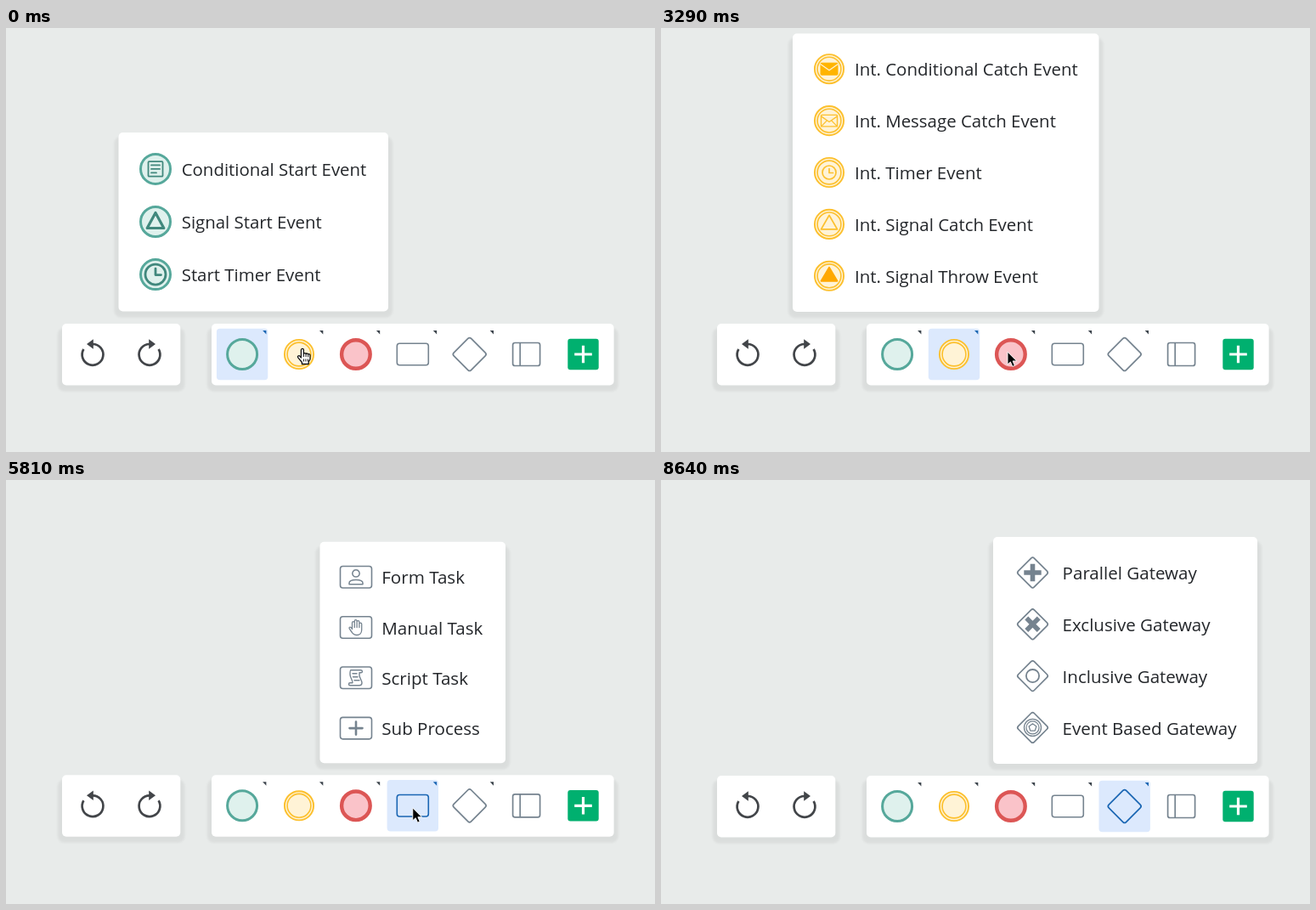
These frames come from a looping animation (764x499 px, 8.94 s). An HTML page:

```html
<!DOCTYPE html>
<html lang="en">
<head>
<meta charset="utf-8">
<title>Process editor palette</title>
<style>
  html, body { margin: 0; width: 100%; height: 100%; overflow: hidden; background: #e8ebea; }
  svg { display: block; width: 764px; height: 499px; }
  text { font-family: "Open Sans", sans-serif; fill: #24272b; }
</style>
</head>
<body>
<svg id="stage" viewBox="0 0 764 499">
  <defs>
    <filter id="soft" x="-10%" y="-20%" width="120%" height="140%"><feGaussianBlur stdDeviation="1.7"/></filter>
  </defs>
  <rect width="764" height="499" fill="#e8ebea"/>
  <g id="scenes"></g>
  <g id="hand">
    <path d="M-1.6 1.5V-7.6a1.5 1.5 0 0 1 3 0V-3a1.4 1.4 0 0 1 2.7 .2a1.4 1.4 0 0 1 2.6 .5a1.3 1.3 0 0 1 2.3 .9V3.2L7.2 6.4V9H-.6V7L-5.4 1.2a1.4 1.4 0 0 1 2-1.8Z"
      fill="#fff" stroke="#111" stroke-width="1.3" stroke-linejoin="round"/>
    <path d="M1.4 -3V.6M4.1 -2.6V.6M6.7 -2V.8M1.4 3V6M3.9 3V6M6.3 3V6" stroke="#111" fill="none"/>
  </g>
  <path id="arrow" d="M0 0V14.8L3.4 11.7L5.8 17.2L8.4 16.1L6.1 10.7H10.7Z" fill="#000" stroke="#fff" stroke-width=".9"/>
</svg>
<script>
const TEAL = '#56a89b', DEEP = '#41887d', MINT = '#dff1ed';
const GOLD = '#fcc02e', AMBER = '#ffa800', CREAM = '#fff3d6';
const RED = '#dc5655', BLUSH = '#fdeced', SLATE = '#75838f', BLUE = '#1a66b3';
const $ = id => document.getElementById(id);

// Shape helpers
const line = (d, color, w = 1.6, fill = 'none') =>
  `<path d="${d}" fill="${fill}" stroke="${color}" stroke-width="${w}" stroke-linejoin="round" stroke-linecap="round"/>`;
const bar = (d, color, w) => `<path d="${d}" fill="none" stroke="${color}" stroke-width="${w}"/>`;
const solid = (d, color) => `<path d="${d}" fill="${color}"/>`;
const circle = (r, color, w, fill = 'none') =>
  `<circle r="${r}" fill="${fill}" stroke="${color}" stroke-width="${w}"/>`;
const box = (w, h, r, color, sw = 1.6, fill = 'none') =>
  `<rect x="${-w / 2}" y="${-h / 2}" width="${w}" height="${h}" rx="${r}" fill="${fill}" stroke="${color}" stroke-width="${sw}"/>`;
const at = (x, y, s, more = '') => `<g transform="translate(${x} ${y}) ${more}">${s}</g>`;
const turn = s => `<g transform="rotate(45)">${s}</g>`;
const tri = (w, top, bottom) => `M0 ${top}L${w} ${bottom}H${-w}Z`;

function panel(x, y, x2, y2) {
  const w = x2 - x, h = y2 - y;
  return `<rect x="${x - 5}" y="${y + 5}" width="${w + 10}" height="${h + 2}" rx="8" fill="#000" opacity=".055" filter="url(#soft)"/>
    <rect x="${x}" y="${y}" width="${w}" height="${h}" rx="5" fill="#fff"/>`;
}

function mail(w, h, color, flap) {
  const a = w / 2, b = h / 2;
  const fold = `M${-a} ${1.5 - b}L0 ${b * .22}L${a} ${1.5 - b}`;
  return flap
    ? box(w, h, 1, color, 1, color) + line(fold, flap, 1.3)
    : box(w, h, 1, color, 1.4) + line(fold + `M${-a} ${b}L${-a * .3} 0M${a} ${b}L${a * .3} 0`, color, 1.3);
}

const ring = {
  start: circle(17.5, TEAL, 3, MINT),
  mid: circle(17.1, GOLD, 1.9, CREAM) + circle(13.9, GOLD, 1.6),
  end: circle(17.6, RED, 3, BLUSH)
};
const diamond = (side, color, w) => turn(box(side, side, 2.6, color, w));
const task = box(37, 25.5, 3, SLATE, 1.6);
const gate = diamond(26.5, SLATE, 1.7);
const cross = bar('M-10.2 0H10.2M0 -10.2V10.2', SLATE, 5.6);

function pentagon(r) {
  const pts = [0, 1, 2, 3, 4].map(i => {
    const a = i * Math.PI * .4;
    return (r * Math.sin(a)).toFixed(2) + ' ' + (-r * Math.cos(a)).toFixed(2);
  });
  return 'M' + pts.join('L') + 'Z';
}

const menus = [
  { area: [132.5, 123, 450, 333.5], icon: 176, text: 206.7, top: 166.3, step: 62.1, size: 20.4, rows: [
    ['Conditional Start Event', ring.start + box(17, 17.5, 1, DEEP, 1.8) + line('M-5 -4.5H5M-5 0H5M-5 4.5H1', DEEP, 1.8)],
    ['Signal Start Event', ring.start + line(tri(9.8, -10.5, 7.5), DEEP, 3.2)],
    ['Start Timer Event', ring.start + circle(12, DEEP, 2.8) + line('M0 -7V.5H6.5', DEEP, 2.8)]
  ] },
  { area: [155, 6.5, 515.5, 334], icon: 198, text: 228, top: 48.6, step: 60.9, size: 20.45, rows: [
    ['Int. Conditional Catch Event', ring.mid + mail(20, 14, '#ffb400', CREAM)],
    ['Int. Message Catch Event', ring.mid + mail(19, 13.5, GOLD)],
    ['Int. Timer Event', ring.mid + circle(8, GOLD, 1.7) + line('M0 -4.5V.5H4.5', GOLD, 1.7)],
    ['Int. Signal Catch Event', ring.mid + line(tri(9.5, -10.5, 6), GOLD, 1.8)],
    ['Int. Signal Throw Event', ring.mid + line(tri(9.5, -10, 6), AMBER, 1.8, AMBER)]
  ] },
  { area: [254, 54.7, 553, 332.7], icon: 298, text: 330, top: 98.4, step: 63.5, size: 20.45, rows: [
    ['Error End Event', circle(16.8, RED, 4.3, BLUSH) + solid('M-9 9.5L-4.5 -11L2 -1L8.5 -10L3.8 10.5L-2.5 .5Z', RED)],
    ['Message End Event', circle(17.6, '#f16d77', 4.4, BLUSH) + mail(24, 17.5, RED, BLUSH)],
    ['Signal End Event', ring.end + line(tri(12.2, -13, 8.5), RED, 1.6, RED)],
    ['Terminate End Event', ring.end + `<circle r="12.2" fill="${RED}"/>`]
  ] },
  { area: [369.5, 73.5, 588, 334], icon: 412, text: 442.2, top: 115.3, step: 59.3, size: 20.6, rows: [
    ['Form Task', task + line('M0 -8.5a4.2 4.2 0 1 1 -.01 0ZM-8 8.5V7C-8 2 8 2 8 7V8.5Z', SLATE, 1.5)],
    ['Manual Task', task + line('M-4.5 2V-5.5a1.4 1.4 0 0 1 2.8 0V-7.5a1.4 1.4 0 0 1 2.8 0V-6.5a1.4 1.4 0 0 1 2.8 0V-4a1.4 1.4 0 0 1 2.8 0V3C6.7 7 4 9 1 9C-3 9 -4 7 -8 1C-8 -1 -6 -1 -4.5 2M-1.7 -5V0M1.1 -6V0M3.9 -5V0', SLATE, 1.3)],
    ['Script Task', task + line('M-6 -9H5.5C8 -9 8 -6 6 -6H4V-3C4 0 7 3 7 6C7 9 5 9 4 9H-7C-9 9 -9 6 -7 6H-4C-4 2 -7 0 -7 -4C-7 -7 -7 -9 -6 -9M-4 -5H1M-3.5 -1H2M-2 3H4', SLATE, 1.4)],
    ['Sub Process', task + line('M-7.5 0H7.5M0 -7.5V7.5', SLATE, 2.6)]
  ] },
  { area: [391, 67, 702, 334], icon: 437.5, text: 472.6, top: 109.4, step: 60.8, size: 20.55, rows: [
    ['Parallel Gateway', gate + cross],
    ['Exclusive Gateway', gate + turn(cross)],
    ['Inclusive Gateway', gate + circle(7.6, SLATE, 1.8)],
    ['Event Based Gateway', gate + circle(10, SLATE, 1.3) + circle(7.5, SLATE, 1.2) + line(pentagon(4.6), SLATE, 1.3)]
  ] }
];

function menu(m) {
  return panel(...m.area) + m.rows.map(([label, icon], i) => {
    const y = m.top + i * m.step;
    return at(m.icon, y - .4, icon) +
      `<text x="${m.text}" y="${(y + 7.7).toFixed(1)}" font-size="${m.size}">${label}</text>`;
  }).join('');
}

function toolbar(active) {
  const tint = i => i === active ? BLUE : SLATE;
  const arrow = bar('M0 -12.4A12.4 12.4 0 1 1 -10.6 -6.4', '#424549', 2.7) +
    solid('M-7 -12.4L.8 -18.2V-6.6Z', '#424549');
  const tools = [
    circle(17.5, TEAL, 3, MINT),
    ring.mid,
    circle(16.8, RED, 4.4, '#fac3c9'),
    box(37, 25.5, 3, tint(3), 1.6),
    diamond(28.8, tint(4), 1.7),
    box(32, 27, 2.5, SLATE, 1.7) + line('M-7.4 -13V13', SLATE, 1.7),
    '<rect x="-18.2" y="-18.2" width="36.4" height="36.4" rx="3" fill="#00b06f"/>' +
      bar('M-10.3 0H10.3M0 -10.3V10.3', '#fff', 3.2)
  ];
  return panel(66, 348, 205.3, 420.5) + panel(242, 348, 715.6, 420.5) +
    at(102, 384.4, arrow) + at(169, 384.4, arrow, 'scale(-1 1)') +
    tools.map((s, i) => {
      const hit = i === active;
      const back = hit ? '<rect x="-30.2" y="-30.2" width="60.4" height="60.4" rx="4" fill="#dce9fd"/>' : '';
      const corner = i < 5 ? solid('M24 -28H28.3V-23.5Z', hit ? BLUE : '#3c444c') : '';
      return at((278.1 + i * 66.9).toFixed(1), 384, back + s + corner);
    }).join('');
}

$('scenes').innerHTML = menus.map((m, i) => `<g>${menu(m)}${toolbar(i)}</g>`).join('');
const scenes = [...$('scenes').children];

const LOOP = 8940;
const ticks = [0, 900, 1050, 1200, 2240, 2390, 3290, 3440, 3590, 3740, 4040, 4190, 4340, 4480, 4780,
  5080, 5230, 5370, 5670, 5820, 5970, 6110, 6860, 7010, 7160, 8200, 8350, 8490, 8640];
const fades = [810, 3290, 4990, 6710]; // each dissolve takes 300 ms
const moves = [ // start, end, x, y
  [2090, 2390, 408, 381.2],
  [3890, 4600, 467.5, 385.8],
  [5520, 6110, 537.5, 386.8],
  [8100, 8640, 798, 497]
];

const part = (t, a, b) => Math.min(1, Math.max(0, (t - a) / (b - a)));
const ease = k => k * k * (3 - 2 * k);

function render(ms) {
  // The picture holds still between ticks.
  const t = ticks.filter(v => v <= ms).pop();
  const mix = fades.map(a => part(t, a, a + 300));
  const lift = t >= 3440 && t < 7160 ? -.7 : 0;
  scenes.forEach((g, i) => {
    const shown = i ? mix[i - 1] : 1;
    const gone = i < 4 ? mix[i] : 0;
    const alpha = shown * (1 - gone);
    g.setAttribute('opacity', alpha);
    g.setAttribute('display', alpha > 0 ? 'inline' : 'none');
    g.setAttribute('transform', `translate(0 ${lift})`);
  });

  let x = 349, y = 376.5;
  for (const [a, b, tx, ty] of moves) {
    const k = ease(part(t, a, b));
    x += (tx - x) * k;
    y += (ty - y) * k;
  }
  $('arrow').setAttribute('transform', `translate(${x} ${y})`);
  $('arrow').setAttribute('opacity', mix[0]);
  $('hand').setAttribute('transform', 'translate(349 386.5)');
  $('hand').setAttribute('opacity', 1 - mix[0]);
}

const begin = performance.now();
function loop() {
  render((performance.now() - begin) % LOOP);
  requestAnimationFrame(loop);
}
render(0);
requestAnimationFrame(loop);
</script>
</body>
</html>
```
